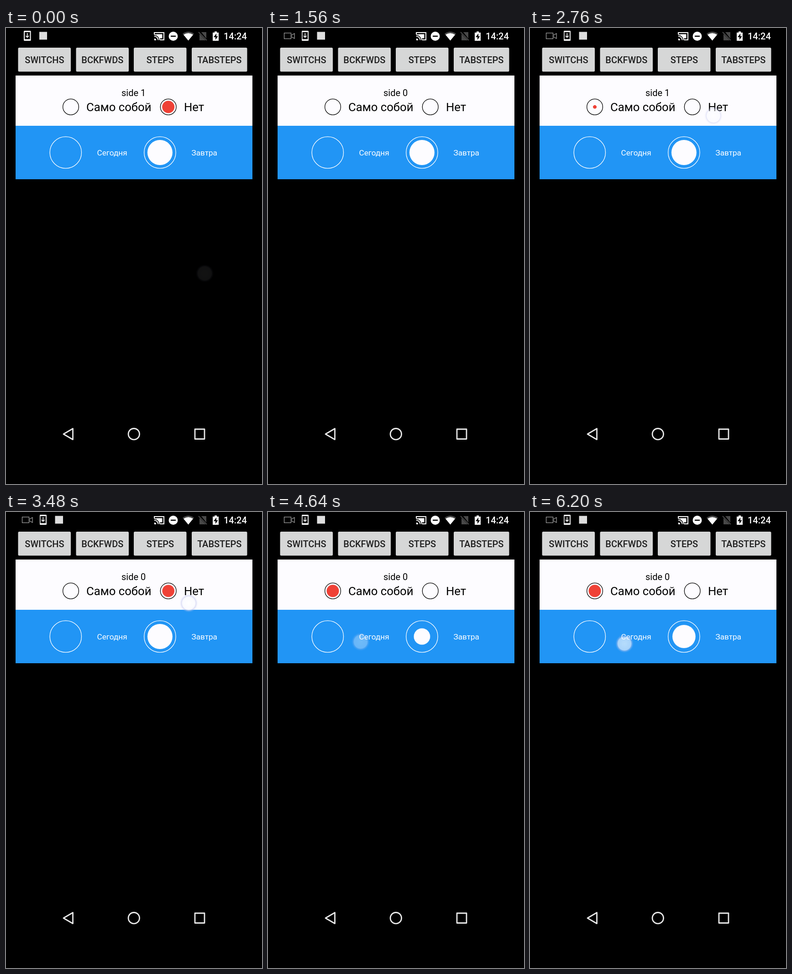
Animation, 561 px wide and 998 px high, one loop 6240 ms. Source, as an HTML page:

```html
<!DOCTYPE html>
<html lang="ru">
<head>
<meta charset="utf-8">
<title>Switches</title>
<style>
  html, body { margin: 0; width: 100%; height: 100%; overflow: hidden; background: #000; }
  svg { display: block; width: 561px; height: 998px; font-family: Roboto, sans-serif; }
  .medium { font-size: 20px; font-weight: 500; }
  .side { font-size: 20px; }
  .large { font-size: 25.7px; }
  .small { font-size: 17.14px; fill: #fff; }
  .line { fill: none; stroke-width: 1.3; }

  .moving { animation: 6240ms infinite both; }
  .dot { transform-box: fill-box; transform-origin: center; animation-timing-function: cubic-bezier(.37, 0, .63, 1); }
  .red-left { animation-name: red-left; }
  .red-right { animation-name: red-right; }
  .white-left { animation-name: white-left; }
  .white-right { animation-name: white-right; }
  .side-one { animation-name: side-one; animation-timing-function: step-end; }
  .side-zero { animation-name: side-zero; animation-timing-function: step-end; }
  .notices { animation-name: make-room; }
  .camera { animation-name: appear; }
  .touch-place { animation-name: touch-place; animation-timing-function: step-end; }
  .touch { animation-name: touch; animation-timing-function: linear; }

  /* The filled dot shrinks away before the other one grows. */
  @keyframes red-right {
    0%, 19.87% { transform: scale(1); }
    24.68%, 30.45% { transform: scale(0); }
    35.1%, 35.74% { transform: scale(1); }
    40.54%, 45.83% { transform: scale(0); }
    50.8%, 55.45% { transform: scale(1); }
    60.26%, 100% { transform: scale(0); }
  }
  @keyframes red-left {
    0%, 24.68% { transform: scale(0); }
    27.24% { transform: scale(.6); }
    30.45%, 40.54% { transform: scale(0); }
    42.95% { transform: scale(.5); }
    45.83%, 60.26% { transform: scale(0); }
    64.74%, 100% { transform: scale(1); }
  }
  @keyframes white-right {
    0%, 72.44% { transform: scale(1); }
    77.24%, 92.79% { transform: scale(0); }
    97.6% { transform: scale(1); }
    98.56% { transform: scale(1); animation-timing-function: ease-in; }
    100% { transform: scale(.8); }
  }
  @keyframes white-left {
    0%, 77.24% { transform: scale(0); }
    82.05%, 87.98% { transform: scale(1); }
    92.79%, 100% { transform: scale(0); }
  }
  @keyframes side-one {
    0%, 27.24%, 42.95% { opacity: 1; }
    19.87%, 35.74%, 55.45%, 100% { opacity: 0; }
  }
  @keyframes side-zero {
    0%, 27.24%, 42.95% { opacity: 0; }
    19.87%, 35.74%, 55.45%, 100% { opacity: 1; }
  }
  @keyframes make-room {
    0%, .64% { transform: none; }
    7%, 100% { transform: translateX(34.5px); }
  }
  @keyframes appear {
    0%, .64% { opacity: 0; }
    7%, 100% { opacity: 1; }
  }
  @keyframes touch-place {
    0% { transform: translate(435.5px, 537px); }
    16% { transform: translate(396px, 197px); }
    25.6% { transform: translate(393px, 196px); }
    33.3% { transform: translate(389.5px, 195px); }
    41.4% { transform: translate(402px, 192px); }
    50.5% { transform: translate(400.5px, 199.5px); }
    69% { transform: translate(203px, 284px); }
    84.2% { transform: translate(367px, 284px); }
    96.2%, 100% { transform: translate(207px, 288px); }
  }
  @keyframes touch {
    0% { opacity: .08; }
    1.3%, 19% { opacity: 0; }
    19.1%, 19.87% { opacity: 1; }
    23.1%, 25.7% { opacity: 0; }
    25.8%, 27.24% { opacity: 1; }
    30.45%, 33.8% { opacity: 0; }
    33.9%, 35.74% { opacity: 1; }
    38.9%, 41.7% { opacity: 0; }
    41.8%, 42.95% { opacity: 1; }
    46.15%, 50.8% { opacity: 0; }
    50.9%, 55.45% { opacity: 1; }
    58.65%, 71% { opacity: 0; }
    71.1%, 72.44% { opacity: 1; }
    75.64%, 85.1% { opacity: 0; }
    85.2%, 87.98% { opacity: 1; }
    91.2%, 97.6% { opacity: 0; }
    97.7%, 98.56% { opacity: 1; }
    100% { opacity: .55; }
  }
</style>
</head>
<body>
<svg viewBox="0 0 561 998">
  <defs>
    <radialGradient id="spot">
      <stop offset="0" stop-color="#fff" stop-opacity=".9"/>
      <stop offset=".72" stop-color="#f8f9ff" stop-opacity=".85"/>
      <stop offset=".79" stop-color="#c0c4ec" stop-opacity=".7"/>
      <stop offset=".87" stop-color="#c8cdf0" stop-opacity=".3"/>
      <stop offset="1" stop-color="#c8cdf0" stop-opacity="0"/>
    </radialGradient>
  </defs>
  <rect width="561" height="998"/>

  <!-- Status bar -->
  <g class="moving camera" fill="none" stroke="#aaa" stroke-width="1.2">
    <rect x="35.5" y="11" width="15" height="12.5"/>
    <path d="M51 16l7-4v11l-7-4"/>
  </g>
  <g class="moving notices">
    <rect x="39" y="6" width="15.5" height="22" rx="1.5" fill="#fff"/>
    <rect x="41" y="9" width="11.5" height="15.5"/>
    <path d="M46.7 11v9M43.2 17l3.5 3.5 3.5-3.5" fill="none" stroke="#fff" stroke-width="1.7"/>
    <rect x="73" y="8.5" width="17" height="17" fill="#dedede"/>
  </g>
  <g fill="none" stroke="#fff" stroke-width="2">
    <path d="M325 14v-4h21v16h-8M325 18a8.500 8.500 0 0 1 8.500 8.500M325 14.500a12 12 0 0 1 12 12"/>
    <path d="M329 13.500h13.500v9h-5z" fill="#fff" stroke="none"/>
    <path d="M325 23a4 4 0 0 1 4 4h-4z" fill="#fff" stroke="none"/>
  </g>
  <circle cx="366.500" cy="18" r="10" fill="#fff"/>
  <rect x="361" y="16.700" width="11" height="2.600"/>
  <path d="M387 12.500q12.500-9 25 0L399.500 27.500z" fill="#4a4a4a"/>
  <path d="M389 14.800q10.500-7 21 0L399.500 27.500z" fill="#fff"/>
  <path d="M428 9h11v14zM424 13l14 14h-14z" fill="#484848"/>
  <path d="M422 9l18 18" stroke="#484848" stroke-width="2"/>
  <path d="M453 10h4v-2.500h5V10h4v18h-13z" fill="#fff"/>
  <path d="M461 12l-6 8h4v6l5.500-8H461z"/>
  <text class="medium" x="477" y="25" fill="#fff">14:24</text>

  <!-- Tabs -->
  <g fill="#d6d7d7">
    <rect x="26.500" y="43" width="115.500" height="52.500" rx="2.500"/>
    <rect x="153.500" y="43" width="115.500" height="52.500" rx="2.500"/>
    <rect x="280" y="43" width="115.500" height="52.500" rx="2.500"/>
    <rect x="407" y="43" width="121.500" height="52.500" rx="2.500"/>
  </g>
  <g class="medium" fill="#1e1e1e" text-anchor="middle">
    <text x="84.500" y="77">SWITCHS</text>
    <text x="211.300" y="77">BCKFWDS</text>
    <text x="338" y="77">STEPS</text>
    <text x="467.800" y="77">TABSTEPS</text>
  </g>

  <!-- White switch -->
  <rect x="21" y="104" width="519" height="110" fill="#fdfcff"/>
  <text class="side" x="253" y="149">side</text>
  <text class="side moving side-one" x="295" y="149">1</text>
  <text class="side moving side-zero" x="295" y="149">0</text>
  <g class="line" stroke="#000">
    <circle cx="142" cy="172.700" r="17.400"/>
    <circle cx="355.700" cy="172.700" r="17.400"/>
  </g>
  <g fill="#ef4136">
    <circle class="moving dot red-left" cx="142" cy="172.700" r="13.500"/>
    <circle class="moving dot red-right" cx="355.700" cy="172.700" r="13.500"/>
  </g>
  <text class="large" x="176" y="182">Само собой</text>
  <text class="large" x="390" y="182">Нет</text>

  <!-- Blue switch -->
  <rect x="21" y="214" width="519" height="117" fill="#2195f5"/>
  <g class="line" stroke="#fff">
    <circle cx="130.800" cy="272.500" r="34.700"/>
    <circle cx="337.400" cy="272.500" r="34.700"/>
  </g>
  <g fill="#fdfcff">
    <circle class="moving dot white-left" cx="130.800" cy="272.500" r="27.500"/>
    <circle class="moving dot white-right" cx="337.400" cy="272.500" r="27.500"/>
  </g>
  <text class="small" x="199.500" y="279">Сегодня</text>
  <text class="small" x="406.500" y="279">Завтра</text>

  <!-- Navigation -->
  <g fill="none" stroke="#e8e8e8" stroke-width="2.800" stroke-linejoin="round">
    <path d="M126 888.700l20.500-12v24z"/>
    <circle cx="280.300" cy="888.700" r="12.200"/>
    <rect x="414" y="878" width="21" height="21.500"/>
  </g>

  <g class="moving touch-place">
    <circle class="moving touch" r="20" fill="url(#spot)"/>
  </g>
</svg>
</body>
</html>
```
